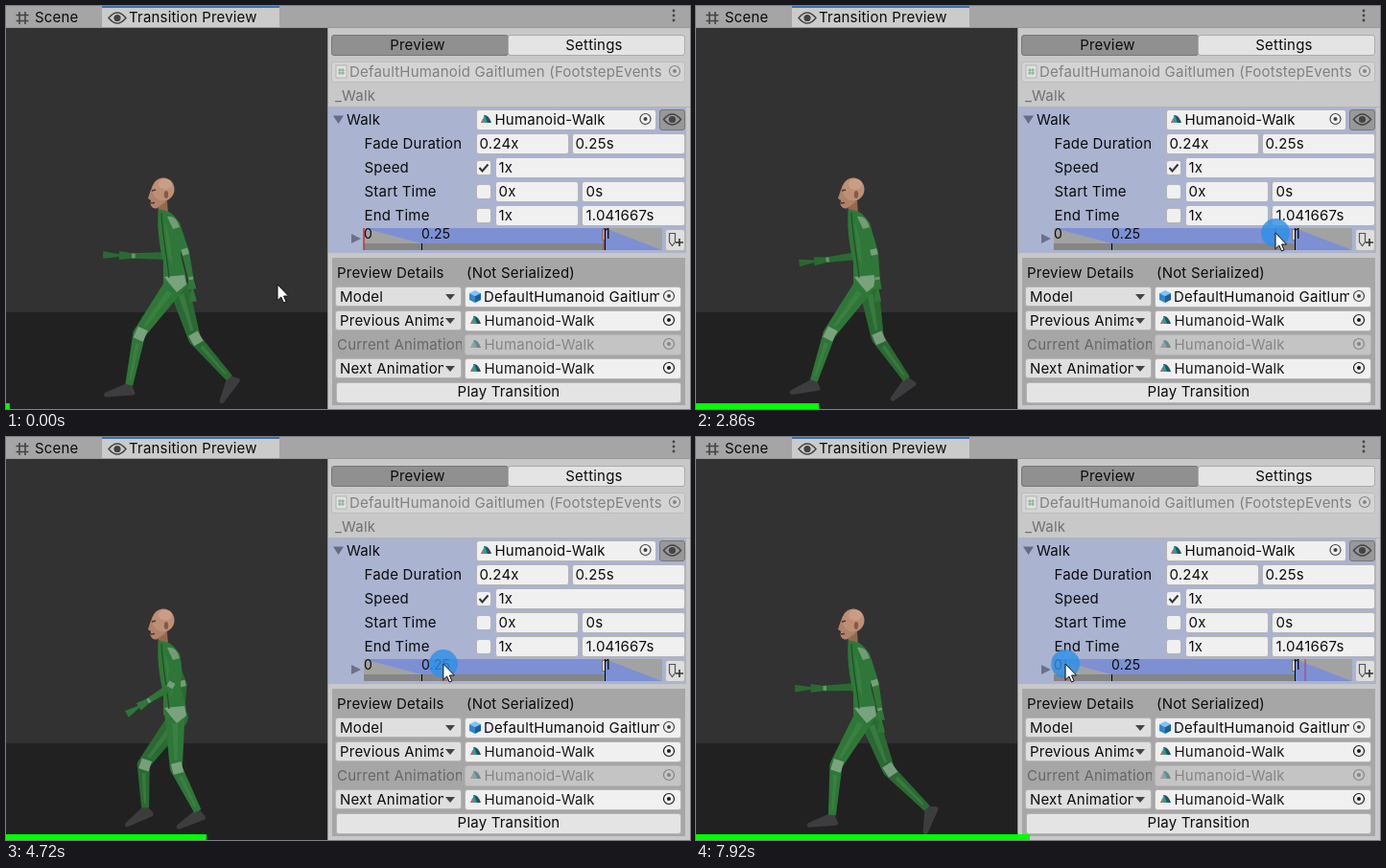
An HTML page that plays this animation: 713x421 px, repeating every 8 s.

```html
<!DOCTYPE html>
<html lang="en">
<head>
<meta charset="utf-8">
<title>Transition Preview</title>
<style>
  html, body { margin: 0; width: 100%; height: 100%; overflow: hidden; background: #c8c8c8; }
  svg { display: block; }
  text { font: 15px Inter, Roboto, sans-serif; letter-spacing: .2px; white-space: pre; }
</style>
</head>
<body>
<svg id="stage" width="713" height="421" viewBox="0 0 713 421">
  <g id="panel"></g>
  <g id="figure"></g>
  <g id="overlay"></g>
</svg>
<script>
const LOOP = 8000;
const TIMELINE = { start: 374, length: 250, left: 373, right: 684 };
const PRESS_AT = 1150;
const REST_X = 373;

// ---------- markup helpers ----------
const rect = (x, y, w, h, fill, extra = '') =>
  `<rect x="${x}" y="${y}" width="${w}" height="${h}" fill="${fill}" ${extra}/>`;
const path = (d, fill, extra = '') => `<path d="${d}" fill="${fill}" ${extra}/>`;
const line = (d, stroke, width = 1, extra = '') =>
  path(d, 'none', `stroke="${stroke}" stroke-width="${width}" ${extra}`);
const dot = (x, y, r, fill, extra = '') => `<circle cx="${x}" cy="${y}" r="${r}" fill="${fill}" ${extra}/>`;
const oval = (x, y, rx, ry, fill, extra = '') =>
  `<ellipse cx="${x}" cy="${y}" rx="${rx}" ry="${ry}" fill="${fill}" ${extra}/>`;
const text = (x, y, label, fill = '#0c0c0c', extra = '') =>
  `<text x="${x}" y="${y}" fill="${fill}" ${extra}>${label}</text>`;
const centered = (x, y, label) => text(x, y, label, '#0c0c0c', 'text-anchor="middle"');
const clipped = (x, y, width, label, fill) =>
  `<svg x="${x}" y="${y - 16}" width="${width}" height="22">${text(0, 16, label, fill)}</svg>`;

const box = (x, y, w, h = 22, fill = '#f0f0f0', stroke = '#b5b5b5') =>
  rect(x + .5, y + .5, w - 1, h - 1, fill, `rx="2.5" stroke="${stroke}"`);
const picker = (x, y, color = '#444') =>
  dot(x, y, 5.5, 'none', `stroke="${color}" stroke-width="1.2"`) + dot(x, y, 2, color);
const eye = (x, y) =>
  line(`M${x - 9} ${y}Q${x} ${y - 11} ${x + 9} ${y}Q${x} ${y + 11} ${x - 9} ${y}Z`, '#444', 1.5) +
  dot(x, y, 3.6, '#444');
const clipIcon = (x, y, opacity = 1) => `<g opacity="${opacity}">` +
  path(`M${x + 3} ${y - 4}Q${x + 8} ${y - 5} ${x + 11} ${y + 4}H${x + 6}Z`, '#27525f') +
  path(`M${x} ${y + 4}L${x + 4} ${y - 4}L${x + 7} ${y + 4}Z`, '#2a9d9a') +
  path(`M${x} ${y + 4}L${x + 2} ${y}L${x + 4} ${y + 4}Z`, '#c7685a') + '</g>';
const cube = (x, y) =>
  path(`M${x} ${y - 6}L${x + 6} ${y - 3}L${x} ${y}L${x - 6} ${y - 3}Z`, '#7cc4f4') +
  path(`M${x - 6} ${y - 3}L${x} ${y}V${y + 7}L${x - 6} ${y + 4}Z`, '#2f86d0') +
  path(`M${x + 6} ${y - 3}L${x} ${y}V${y + 7}L${x + 6} ${y + 4}Z`, '#1b5f9e');
const checkbox = (y, checked) => box(490, y, 16, 16) +
  (checked ? line(`M493.500 ${y + 8}l3 3.500l6 -7`, '#333', 2) : '');
const dropdown = (y, label) => box(343, y, 132, 21, '#dfdfdf') +
  clipped(348, y + 16, 108, label) + path(`M458 ${y + 8}h10l-5 6Z`, '#444');

// ---------- static window ----------
function tabs() {
  return rect(0, 0, 713, 23, '#a5a5a5') + rect(100, 0, 185, 23, '#cbcbcb') +
    rect(100, 0, 185, 2, '#3a72b0') + rect(0, 22, 713, 1, '#999') +
    line('M14 6v13M20 6v13M10.500 9.500h13M10.500 15.500h13', '#444', 1.6) +
    text(30, 17, 'Scene') + eye(116, 12.5) + text(128, 17, 'Transition Preview') +
    [5, 10, 15].map(y => dot(696, y, 1.4, '#444')).join('');
}

function timeline() {
  const { left, right } = TIMELINE;
  return rect(left, 232, right - left, 23, '#a2a2a2') +
    path('M373 232H624V248H433Z', '#7d90d3') +
    path('M624 232L684 255H624Z', '#7d90d3') +
    rect(left, 248, 251, 7, '#858585') +
    rect(433, 248, 1, 7, '#000') +
    rect(621.5, 233.5, 3, 11, '#d0d0d0', 'stroke="#777"') +
    rect(624, 232, 1, 23, '#000') +
    [[373, '0'], [433, '0.25'], [624, '1']]
      .map(([x, label]) => text(x, 243, label, '#0c0c0c', 'style="font-size:14px"')).join('') +
    path('M360 238L370 243L360 248Z', '#6b7189') +
    box(687, 233, 21, 23, '#dedede') +
    line('M691.500 237.500h6v9l-3 4l-3 -4Z', '#555', 1.2) +
    line('M698 247h8M702 243v8', '#333', 1.6);
}

function transition() {
  return rect(336, 106, 373, 152, '#aab3d0') +
    path('M341 114.500H352L346.500 123Z', '#666c84') + text(355, 124, 'Walk') +
    box(490, 108, 188) + clipIcon(495, 118) + text(509.5, 124, 'Humanoid-Walk') + picker(666.5, 118) +
    box(681, 108, 27, 22, '#989898', '#777') + eye(694.5, 118.5) +
    ['Fade Duration', 'Speed', 'Start Time', 'End Time']
      .map((label, i) => text(373.5, 149 + 25 * i, label)).join('') +
    box(490, 133, 97) + text(493.5, 149, '0.24x') + box(590, 133, 118) + text(593.5, 149, '0.25s') +
    checkbox(161, true) + box(510, 158, 198) + text(513.5, 174, '1x') +
    [[183, '0x', '0s'], [208, '1x', '1.041667s']].map(([y, a, b]) => checkbox(y + 3) +
      box(510, y, 87) + text(513.5, y + 16, a) + box(600, y, 108) + text(604.5, y + 16, b)).join('') +
    timeline();
}

function details() {
  const clipField = (y, fill, ink, opacity) => box(478, y, 226, 22, fill) +
    clipIcon(484, y + 10, opacity) + text(498.5, y + 16, 'Humanoid-Walk', ink) + picker(691, y + 10, ink);
  return rect(340, 263, 368, 154, '#a6a6a6') +
    text(345, 284, 'Preview Details') + text(480, 284, '(Not Serialized)') +
    dropdown(293, 'Model') + box(478, 293, 226) + cube(489, 303) +
    clipped(498, 309, 183, 'DefaultHumanoid Gaitlumen') + picker(691, 303) +
    dropdown(318, 'Previous Animation') + clipField(318, '#f0f0f0', '#1a1a1a') +
    clipped(345, 359, 130, 'Current Animation', '#666') + clipField(343, '#c4c4c4', '#858585', .55) +
    dropdown(368, 'Next Animation') + clipField(368, '#f0f0f0', '#1a1a1a') +
    box(344, 393, 360, 22, '#e4e4e4') + centered(524, 408, 'Play Transition');
}

function drawPanel() {
  return rect(335, 23, 378, 398, '#c8c8c8') + rect(335, 23, 1, 398, '#999') +
    rect(0, 23, 335, 298, '#323232') + rect(0, 320, 335, 101, '#212121') + tabs() +
    box(339, 30, 185, 22, '#909090', '#777') + centered(429, 46, 'Preview') +
    box(523, 30, 185, 22, '#e4e4e4', '#aaa') + centered(613, 46, 'Settings') +
    box(339, 58, 369, 22, '#d4d4d4', '#bcbcbc') +
    rect(344, 62, 11, 13, '#e2e2e2', 'stroke="#b4b4b4"') +
    line('M348 65v7M351 65v7M346 67h7M346 70h7', '#7faa8c') +
    clipped(358, 74, 329, 'DefaultHumanoid Gaitlumen (FootstepEvents', '#808080') +
    picker(697, 68, '#858585') +
    text(343, 99, '_Walk', '#707070') + rect(336, 105, 377, 1, '#b4b4b4') +
    transition() + details();
}

// ---------- motion ----------
const mix = (a, b, k) => a + (b - a) * k;
const along = (a, b, k) => [mix(a[0], b[0], k), mix(a[1], b[1], k)];
const fract = v => v - Math.floor(v);
const smooth = k => k * k * (3 - 2 * k);

// Scrubbing path of the pointer: [time, x]
const SCRUB = [[1250, 411], [2860, 604], [3435, 620], [4170, 541], [5270, 371],
  [5700, 352], [6350, 352], [6830, 372], [LOOP, 386]];

function pointer(time) {
  if (time < SCRUB[0][0]) {
    const approach = Math.min(1, Math.max(0, (time - 70) / 750));
    return [mix(283, 411, approach), time < PRESS_AT ? mix(291, 244, approach) : 237];
  }
  const i = SCRUB.findIndex(([t]) => t > time);
  const [[t0, x0], [t1, x1]] = [SCRUB[i - 1], SCRUB[i]];
  return [mix(x0, x1, (time - t0) / (t1 - t0)), 237];
}

// The foot is planted and drifts back until TOE_OFF, then swings forward again.
const TOE_OFF = .544;

function legPose(phase) {
  const planted = phase < TOE_OFF;
  const k = planted ? (phase / TOE_OFF) ** .85 : (phase - TOE_OFF) / (1 - TOE_OFF);
  const kneeX = planted ? mix(-39, 20, k) : mix(-39, 20, (1 - k) ** 4);
  const knee = [178 + kneeX, 346 + kneeX * .1];
  const ankle = planted
    ? [mix(129, 238, k), mix(396, 388, k)]
    : [mix(238, 129, k) - 30 * Math.sin(Math.PI * k * k), mix(388, 396, k) - 6 * Math.sin(Math.PI * k)];
  const pitch = (planted ? mix(66, 4, k ** 3) : mix(4, 66, smooth(k))) * Math.PI / 180;
  const toe = [ankle[0] - 26 * Math.sin(pitch), ankle[1] + 25 * Math.cos(pitch)];
  return [knee, ankle, toe];
}

// Arms swing opposite to the leg of the same side; `reach` pushes the backswing out.
function armPose(phase, reach) {
  const swing = (1 - Math.cos(2 * Math.PI * phase)) / 2;
  const lift = swing ** 3;
  const back = reach * (1 - swing);
  return [
    [mix(187, 168, swing) + back * .3, mix(257, 261, swing)],
    [mix(193, 131, swing) + back * .8, mix(286, 261, lift)],
    [mix(195, 102, swing) + back, mix(308, 260, lift)]
  ];
}

// ---------- figure ----------
const SUIT = { near: '#2f7738', far: '#2a6a32', pale: '#93b294', light: '#458a4b', dark: '#1f4f26' };
const SHOE = '#3d3d3f';

function normal([ax, ay], [bx, by]) {
  const length = Math.hypot(bx - ax, by - ay) || 1;
  return [-(by - ay) / length, (bx - ax) / length];
}
function taper(a, b, startWidth, endWidth, fill, extra) {
  const [nx, ny] = normal(a, b);
  const side = ([x, y], w) => `${x + nx * w / 2} ${y + ny * w / 2}`;
  return path(`M${side(a, startWidth)}L${side(b, endWidth)}L${side(b, -endWidth)}L${side(a, -startWidth)}Z`, fill, extra);
}

function leg(hip, phase, fill, shift) {
  const [knee, ankle, toe] = legPose(fract(phase)).map(([x, y]) => [x + shift, y]);
  const [nx, ny] = normal(toe, ankle);
  const heel = [ankle[0] + nx * 9, ankle[1] + ny * 9];
  return path(`M${ankle}L${heel}L${toe}Z`, SHOE, `stroke="${SHOE}" stroke-width="5" stroke-linejoin="round"`) +
    dot(...hip, 10, fill) + taper(hip, knee, 21, 13, fill) +
    dot(...knee, 6.5, fill) + taper(knee, ankle, 13, 8, fill) +
    taper(along(hip, knee, .15), along(hip, knee, .85), 6, 3, SUIT.light, 'opacity=".5"') +
    taper(along(knee, ankle, .2), along(knee, ankle, .9), 4, 2, SUIT.light, 'opacity=".5"') +
    taper(along(knee, hip, .1), along(knee, ankle, .12), 11, 11, SUIT.pale, 'opacity=".75"');
}

function arm(shoulder, phase, reach, fill) {
  const [elbow, wrist, tip] = armPose(phase, reach);
  const knuckle = along(wrist, tip, .45);
  const [nx, ny] = normal(wrist, tip);
  const finger = k => line(`M${knuckle}L${tip[0] + nx * k} ${tip[1] + ny * k}`, fill, 2.4, 'stroke-linecap="round"');
  return dot(...shoulder, 5.5, fill) + taper(shoulder, elbow, 11, 8, fill) +
    dot(...elbow, 4, fill) + taper(elbow, wrist, 8, 5.5, fill) +
    taper(wrist, knuckle, 5.5, 9, fill) + [-2.5, 0, 2.5].map(finger).join('') +
    taper(along(elbow, shoulder, .12), along(elbow, wrist, .1), 7, 7, SUIT.pale, 'opacity=".7"') +
    taper(along(wrist, elbow, .1), wrist, 5, 5, SUIT.pale, 'opacity=".6"');
}

const HEAD =
  path('M158 204L159 217L169 218L168 203Z', '#94684f') +
  path('M153 187Q150 194 148 201L151 203L150.500 207Q152 212 157 211.500L166 205L170 190Z', '#b0826a') +
  oval(164, 191.5, 11.5, 12, '#bd8f75') + oval(166, 186, 7, 5.5, '#d0a48b', 'opacity=".7"') +
  oval(167, 197, 2.2, 4, '#875a47') + line('M152 193l4 -1M151 206l4 -.500', '#50362d', 1.4);

const TORSO =
  path('M159 212C157 225 159 248 164 268L164 290Q175 301 188 294C190 282 182 268 182 256C185 240 183 223 170 215Z', SUIT.near) +
  path('M165 283L186 281L188 291L178 299L172 292Z', SUIT.pale, 'opacity=".75"') +
  line('M162 216C163 240 168 262 170 284', SUIT.dark, 1.2) +
  path('M165 225Q172 240 173 272L169 262Z', SUIT.light, 'opacity=".45"');

function drawFigure(phase) {
  return arm([171, 228], phase + .5, 12, SUIT.far) +
    leg([180, 293], phase + .5, SUIT.far, 3) + leg([176, 291], phase, SUIT.near, 0) +
    HEAD + TORSO + arm([176, 229], phase, 0, SUIT.near) +
    path('M168 220Q177 218 181 231L174 233Z', SUIT.pale, 'opacity=".65"');
}

// ---------- overlay ----------
function playhead(x) {
  const { left, right, length } = TIMELINE;
  const mark = (at, opacity) => at >= left && at <= right
    ? rect(at - .75, 232, 1.5, 23, '#d02a2a', `opacity="${opacity}"`) : '';
  return mark(x, .95) + mark(x + length, .6);
}

const ARROW = path('M0 0V16.500L3.800 13L6.400 19L9 17.900L6.500 12H11.500Z', '#fff',
  'stroke="#111" stroke-width="1" stroke-linejoin="round"');

function drawOverlay(time, x, y, playX, pressed) {
  return playhead(playX) +
    (pressed ? dot(x, y, 15, '#2a90e8', 'opacity=".8"') : '') +
    `<g transform="translate(${x} ${y})">${ARROW}</g>` +
    rect(0, 415, 3.8 + time * .04345, 6, '#00ff00');
}

// ---------- loop ----------
const byId = id => document.getElementById(id);
byId('panel').innerHTML = drawPanel();

function render(now) {
  const time = now % LOOP;
  const [x, y] = pointer(time);
  const pressed = time >= PRESS_AT;
  const playX = pressed ? x : REST_X;
  byId('figure').innerHTML = drawFigure(fract((playX - TIMELINE.start) / TIMELINE.length));
  byId('overlay').innerHTML = drawOverlay(time, x, y, playX, pressed);
}

const startTime = performance.now();
function tick() {
  render(performance.now() - startTime);
  requestAnimationFrame(tick);
}
tick();
</script>
</body>
</html>
```
